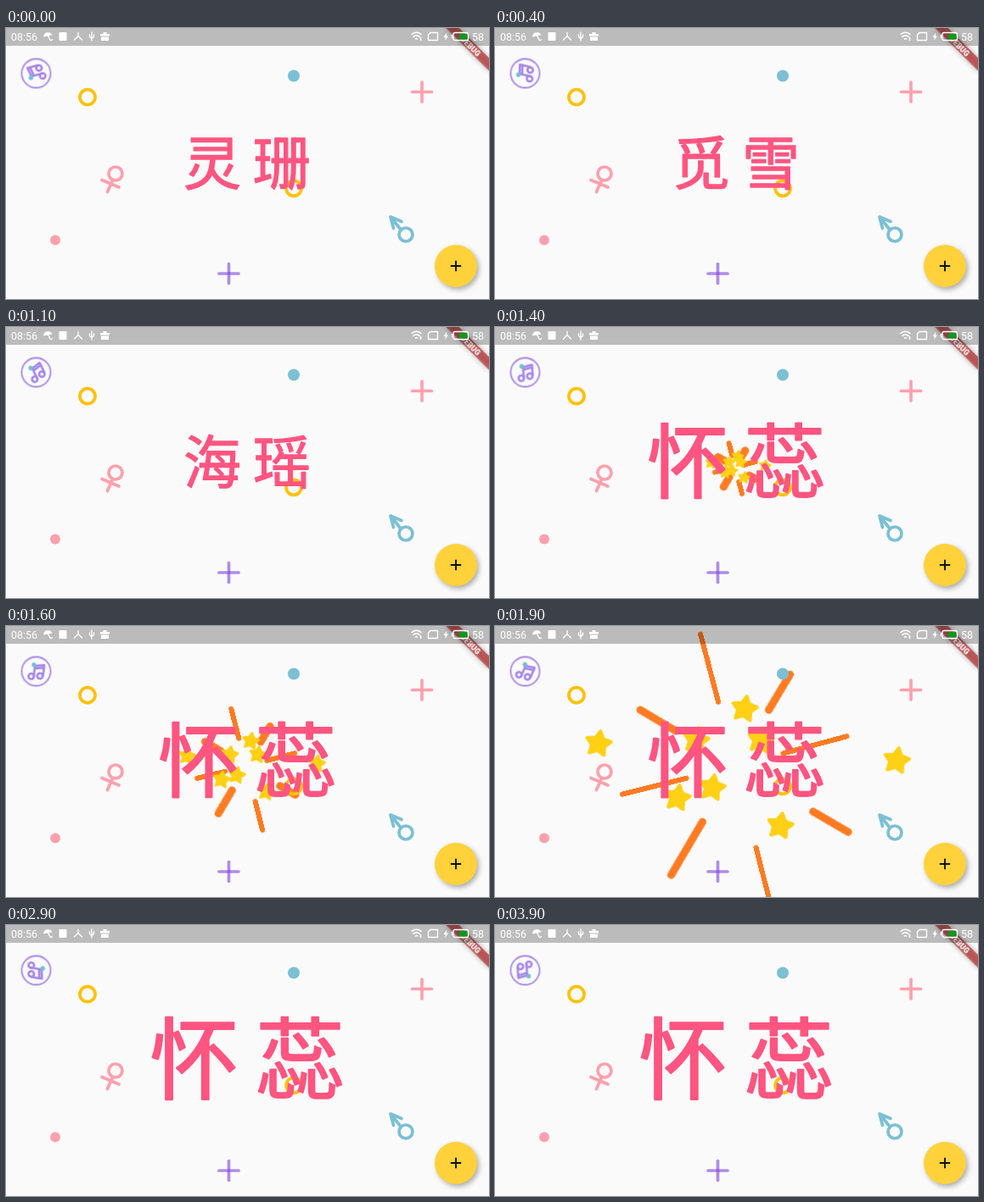
An HTML page for the animation above (4000 ms loop, 569x320 px).

```html
<!DOCTYPE html>
<html lang="zh-Hans">
<head>
<meta charset="utf-8">
<title>Name picker</title>
<style>
  html, body { margin: 0; width: 100%; height: 100%; overflow: hidden; background: #fafafa; }
  svg { display: block; width: 569px; height: 320px; font-family: Roboto, sans-serif; }

  .line { fill: none; stroke-linecap: round; stroke-linejoin: round; }
  .pink { stroke: #ffa0ad; }
  .blue { stroke: #7bc0d4; }
  .gold { stroke: #ffc107; }
  .violet { stroke: #a685e8; }

  /* Rolling names, one every 100 ms */
  .name {
    font: 400 68px "Noto Sans CJK SC", "Noto Sans CJK", sans-serif;
    text-anchor: middle; fill: #ff5580;
    stroke: #ff5580; stroke-width: 1.3; stroke-linejoin: round;
    opacity: 0; animation: 4s step-end infinite;
  }
  .n1 { animation-name: n1; }
  .n2 { animation-name: n2; }
  .n3 { animation-name: n3; }
  .pick { animation-name: pick; }
  @keyframes n1 {
    0%, 7.5%, 15%, 22.5%, 30% { opacity: 1; }
    2.5%, 10%, 17.5%, 25%, 32.5%, to { opacity: 0; }
  }
  @keyframes n2 {
    2.5%, 10%, 17.5%, 25% { opacity: 1; }
    0%, 5%, 12.5%, 20%, 27.5%, to { opacity: 0; }
  }
  @keyframes n3 {
    5%, 12.5%, 20%, 27.5% { opacity: 1; }
    0%, 7.5%, 15%, 22.5%, 30%, to { opacity: 0; }
  }
  @keyframes pick { 0% { opacity: 0; } 32.5%, to { opacity: 1; } }

  .grow { transform-origin: 285px 157px; animation: grow 4s ease-in-out infinite; }
  @keyframes grow {
    0%, 49% { transform: scale(1.41); }
    58%, to { transform: scale(1.54); }
  }

  /* Burst: --i gap from the centre, --l length of a rod */
  .burst { animation: burst 4s step-end infinite; }
  @keyframes burst { 0%, 60%, to { opacity: 0; } 33.5% { opacity: 1; } }

  .rod { stroke: #ff7b22; animation: rod 4s linear infinite; }
  @keyframes rod {
    0%, 32.5% { stroke-dasharray: 0 999px; stroke-dashoffset: 0; }
    35% {
      stroke-dasharray: calc(var(--l) * .18px) 999px;
      stroke-dashoffset: calc(var(--i) * -.18px);
    }
    42.5% {
      stroke-dasharray: calc(var(--l) * .56px) 999px;
      stroke-dashoffset: calc(var(--i) * -.56px);
    }
    47.5% {
      stroke-dasharray: calc(var(--l) * 1px) 999px;
      stroke-dashoffset: calc(var(--i) * -1px);
    }
    59%, to {
      stroke-dasharray: 0 999px;
      stroke-dashoffset: calc((var(--i) + var(--l)) * -1.3px);
    }
  }

  .star { fill: #ffd014; stroke: #ffd014; stroke-width: 4; animation: star 4s linear infinite; }
  @keyframes star {
    0%, 32.5% { transform: scale(0); }
    35% { transform: translate(calc(var(--x) * .18px), calc(var(--y) * .18px)) scale(.45); }
    42.5% { transform: translate(calc(var(--x) * .56px), calc(var(--y) * .56px)) scale(.75); }
    47.5% { transform: translate(calc(var(--x) * 1px), calc(var(--y) * 1px)); }
    52% { transform: translate(calc(var(--x) * 1.14px), calc(var(--y) * 1.14px)) scale(.85); }
    59%, to { transform: translate(calc(var(--x) * 1.2px), calc(var(--y) * 1.2px)) scale(0); }
  }

  .note { animation: turn 4s linear infinite; }
  @keyframes turn {
    0% { transform: rotate(-101deg); }
    35% { transform: rotate(0deg); }
    47.5% { transform: rotate(28deg); }
    to { transform: rotate(187deg); }
  }
</style>
</head>
<body>
<svg viewBox="0 0 569 320">
  <defs>
    <path id="star" transform="rotate(10)" stroke-linejoin="round"
      d="M0-15 4.7-6.5 14.3-4.6 7.6 2.5 8.8 12.1 0 8-8.8 12.1-7.6 2.5-14.3-4.6-4.7-6.5Z"/>
    <path id="ray" d="M0 0H400"/>
    <filter id="soft" x="-50%" y="-50%" width="200%" height="200%">
      <feGaussianBlur stdDeviation="3"/>
    </filter>
  </defs>

  <rect width="569" height="320" fill="#fafafa"/>

  <g class="burst">
    <g class="line" transform="translate(283 165.5)">
      <g stroke-width="6">
        <use href="#ray" class="rod" transform="rotate(-104.7)" style="--i:78;--l:83"/>
        <use href="#ray" class="rod" transform="rotate(-15)" style="--i:58;--l:78"/>
        <use href="#ray" class="rod" transform="rotate(75.7)" style="--i:99;--l:80"/>
        <use href="#ray" class="rod" transform="rotate(166)" style="--i:59;--l:78"/>
      </g>
      <g stroke-width="9">
        <use href="#ray" class="rod" transform="rotate(-59.2)" style="--i:77;--l:49"/>
        <use href="#ray" class="rod" transform="rotate(30.3)" style="--i:106;--l:48"/>
        <use href="#ray" class="rod" transform="rotate(120.4)" style="--i:76;--l:73"/>
        <use href="#ray" class="rod" transform="rotate(210.7)" style="--i:81;--l:49"/>
      </g>
    </g>
    <g transform="translate(284 165)">
      <use href="#star" class="star" style="--x:10;--y:-67"/>
      <use href="#star" class="star" style="--x:-162;--y:-26"/>
      <use href="#star" class="star" style="--x:-47;--y:-30"/>
      <use href="#star" class="star" style="--x:29;--y:-30"/>
      <use href="#star" class="star" style="--x:189;--y:-6"/>
      <use href="#star" class="star" style="--x:-28;--y:26"/>
      <use href="#star" class="star" style="--x:-69;--y:38"/>
      <use href="#star" class="star" style="--x:52;--y:71"/>
    </g>
  </g>

  <g class="line" stroke-width="3.7">
    <circle class="gold" cx="96" cy="81.7" r="9"/>
    <circle class="gold" cx="339" cy="189.3" r="9"/>
    <path class="pink" d="M478.5 75.5H501.5M490 64V87"/>
    <g stroke="#7f43dc" stroke-opacity=".6">
      <path d="M251 290H274"/>
      <path d="M262.5 278.500V301.500"/>
    </g>
    <g class="pink">
      <circle cx="129" cy="172" r="8"/>
      <path d="M125.5 180 119.5 193.500M113 179.500 133 188"/>
    </g>
    <g class="blue">
      <circle cx="471" cy="244" r="8"/>
      <path d="M465 238 453 223M456.500 236.500 453 223 466 228.500"/>
    </g>
  </g>
  <circle cx="339" cy="56.5" r="7" fill="#7bc0d4"/>
  <circle cx="58" cy="250.500" r="6" fill="#ffa0ad"/>

  <g transform="translate(35.5 53.5)">
    <circle r="17" fill="none" class="violet" stroke-width="1.8"/>
    <g class="note">
      <g class="line violet" stroke-width="2.600">
        <circle cx="-4.5" cy="7" r="3.200"/>
        <circle cx="5.500" cy="4.500" r="3.200"/>
        <path d="M-1.500 7-2.500-6 8-9 9 4M-2-3 8.500-6"/>
      </g>
      <circle cx="-4" cy="-7" r="2.700" fill="#6fc0d6"/>
    </g>
  </g>

  <g class="name n1"><text x="243" y="184.500">灵</text><text x="325" y="184.500">珊</text></g>
  <g class="name n2"><text x="243" y="184.500">觅</text><text x="325" y="184.500">雪</text></g>
  <g class="name n3"><text x="243" y="184.500">海</text><text x="325" y="184.500">瑶</text></g>
  <g class="name pick">
    <g class="grow"><text x="244" y="183">怀</text><text x="325" y="183">蕊</text></g>
  </g>

  <!-- Action button -->
  <circle cx="532.500" cy="284" r="24.500" opacity=".34" filter="url(#soft)"/>
  <circle cx="530" cy="281" r="25" fill="#ffd23c"/>
  <path d="M523.800 281H536.200M530 274.800V287.200" stroke="#111" stroke-width="1.900"/>

  <!-- Corner banner -->
  <g transform="translate(569 0) rotate(45)">
    <rect x="-36" y="25" width="72" height="10.700" opacity=".3" filter="url(#soft)"/>
    <rect x="-36" y="25" width="72" height="10.700" fill="#b71c1c" fill-opacity=".63"/>
    <text y="33.500" fill="#fff" font-size="9" font-weight="900" text-anchor="middle">DEBUG</text>
  </g>

  <!-- Status bar -->
  <rect width="569" height="21" fill-opacity=".25"/>
  <g fill="#fff" font-size="12.500">
    <text x="6" y="14.500">08:56</text>
    <text x="549" y="14.500">58</text>
    <path d="M44 10.500A5.500 5.500 0 0 1 54.500 8.500Z"/>
    <rect x="62.500" y="5" width="9" height="10" rx="1"/>
    <path d="M111 7h3.500v-2h4v2h3.500v2.500h-11ZM112 10.500h9v4.500h-9Z"/>
    <path d="M519.500 5.500 515.500 11h2.300l-.8 4 4-5.500h-2.300Z"/>
  </g>
  <g class="line" stroke="#fff" stroke-width="1.300">
    <path d="M49.500 9 52 14q1.500 1.500 2.500-.5"/>
    <path d="M85 5.500V9.500L80.500 14M85 9.500 89.500 14"/>
    <path d="M101 5V15M98.500 8V10.500L101 12.500 103.500 10.500V8"/>
    <path stroke-width="1.600" d="M478 7.500q5.500-4.500 11 0M480 10.300q3.500-3 7 0M482.500 13q1-1 2 0M488.500 11.500v3"/>
    <path d="M500 5.500H508.500V14.500H497.500V8Z"/>
    <rect x="527" y="5.500" width="17.500" height="9" rx="2"/>
    <path d="M525.500 8.500V11.500"/>
  </g>
  <rect x="534" y="7" width="9.500" height="6.500" rx="1" fill="#0b9a1c"/>
</svg>
</body>
</html>
```
